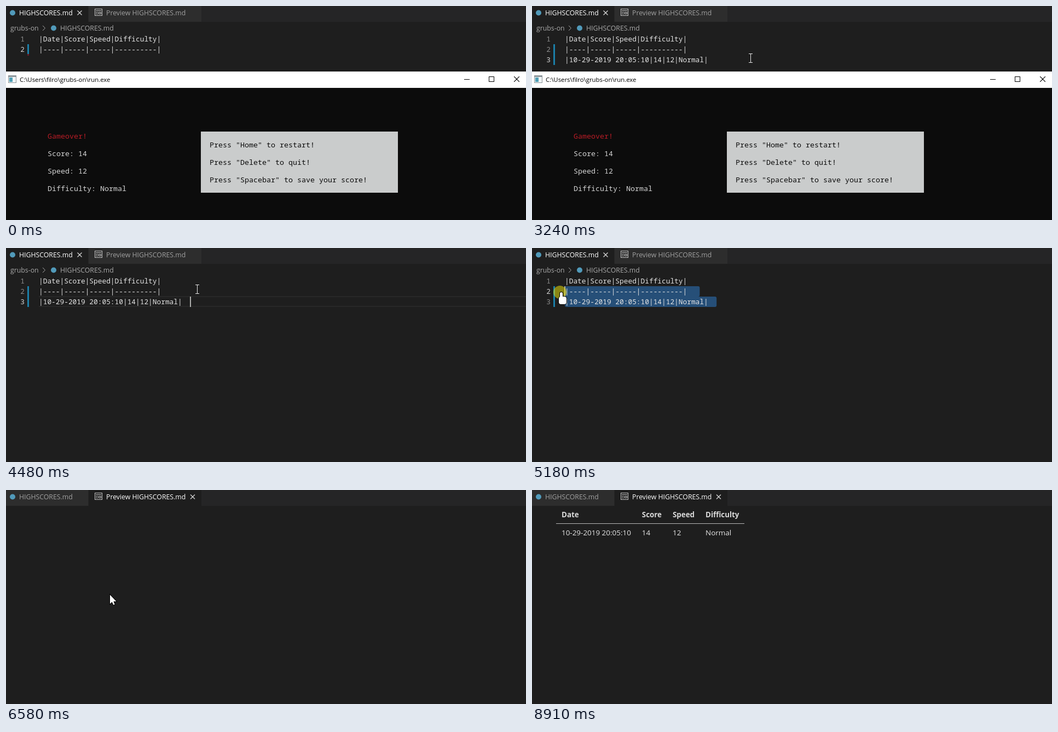
These frames come from a looping animation (950x392 px, 9.22 s). An HTML page with a canvas:

```html
<!DOCTYPE html>
<html lang="en">
<head>
<meta charset="utf-8">
<title>Saving a high score</title>
<style>
html, body { margin: 0; width: 100%; height: 100%; overflow: hidden; background: #1e1e1e; }
canvas { display: block; }
</style>
</head>
<body>
<canvas id="stage" width="950" height="392"></canvas>
<script>
const ctx = document.getElementById('stage').getContext('2d');
const LOOP = 9220, STEP = 77.5;
const UI = '"Open Sans", "Noto Sans", sans-serif';
const MONO = '"Noto Sans Mono", "DejaVu Sans Mono", monospace';
const TAB_FONT = `12.3px ${UI}`;
const CODE_FONT = `12.83px ${MONO}`;
const CONSOLE_FONT = `13.33px ${MONO}`;
const CODE_X = 60, CHAR = 7.7, ROW = 19, ROW_TOP = 51;
const FILE = 'HIGHSCORES.md', FOLDER = 'grubs-on', USER = 'filro';
const HEADS = ['Date', 'Score', 'Speed', 'Difficulty'];
const VALUES = ['10-29-2019 20:05:10', '14', '12', 'Normal'];
const LINES = [HEADS, HEADS.map(head => '-'.repeat(head.length)), VALUES]
  .map(cells => `|${cells.join('|')}|  `);

// Times at which the scene switches
const SAVED = 2240, GUTTER = 2390, FOCUS = 3320, DRAG = 4484, RELEASE = 5650, PREVIEW = 6030, TABLE = 7660;
const CLICK = 150;

// Pointer moves; an optional bend pulls the path into a curve
const MOVES = [
  { start: 840, end: 1460, to: [454, 324] },
  { start: 2390, end: 3240, to: [399, 95], bend: [430, 60] },
  { start: 3400, end: 4090, to: [346, 18] },
  { start: 4330, end: DRAG, to: [350, 95] },
  { start: 4562, end: 5180, to: [53, 82], bend: [120, 100] },
  { start: 5260, end: 5490, to: [52, 97] },
  { start: RELEASE, end: 5880, to: [240, 13] },
  { start: PREVIEW, end: 6890, to: [174, 198], bend: [203, 215] },
  { start: 8280, end: 8910, to: [843, 410], bend: [400, -15] }
];

const ARROW = new Path2D('M0 0V16.5L3.7 13 6.2 18.5 8.7 17.4 6.4 12H11.5Z');
const IBEAM = new Path2D('M-3-7.5h7M.5-7.5v16M-3 8.5h7');
const HAND = new Path2D();
HAND.roundRect(-2, -1, 5, 16, 2.5);
HAND.roundRect(-4, 7, 14, 14, 4);

const ease = u => u * u * (3 - 2 * u);

function pointerAt(t) {
  let from = [402, 357], position = null;
  for (const { start, end, to, bend } of MOVES) {
    if (t < start) break;
    const last = Math.round((end - start) / STEP);
    const step = Math.min(Math.floor((t - start) / (end - start) * last + 1e-6), last);
    const u = ease((step + 1) / (last + 1));
    position = from.map((a, axis) => {
      const middle = bend ? bend[axis] : (a + to[axis]) / 2;
      return (1 - u) ** 2 * a + 2 * u * (1 - u) * middle + u * u * to[axis];
    });
    from = to;
  }
  return position;
}

function rect(x, y, w, h, color) {
  ctx.fillStyle = color;
  ctx.fillRect(x, y, w, h);
}

function frame(x, y, w, h, color) {
  ctx.strokeStyle = color;
  ctx.lineWidth = 1;
  ctx.strokeRect(x + .5, y + .5, w - 1, h - 1);
}

function text(str, x, y, font, color, align = 'left') {
  ctx.font = font;
  ctx.fillStyle = color;
  ctx.textAlign = align;
  ctx.fillText(str, x, y);
}

function line(color, width, ...points) {
  ctx.strokeStyle = color;
  ctx.lineWidth = width;
  ctx.beginPath();
  points.forEach(([x, y]) => ctx.lineTo(x, y));
  ctx.stroke();
}

function cross(x, y, r, color) {
  for (const side of [-r, r]) line(color, 1.2, [x - side, y - r], [x + side, y + r]);
}

function dot(x, y, r, color) {
  ctx.fillStyle = color;
  ctx.beginPath();
  ctx.arc(x, y, r, 0, Math.PI * 2);
  ctx.fill();
}

function drawTabs(preview, hover) {
  const fill = on => on ? '#1e1e1e' : '#2d2d2d';
  const ink = on => on ? '#ffffff' : '#a0a0a0';
  rect(0, 0, 950, 29, '#252526');
  rect(0, 0, 150, 29, fill(!preview));
  rect(151, 0, 206, 29, fill(preview));
  dot(12, 12.5, 5, '#519aba');
  text(FILE, 24, 17, TAB_FONT, ink(!preview));
  if (!preview) cross(134.5, 12.5, 4, '#d8d8d8');

  frame(162, 5, 14, 13, '#c5c5c5');
  rect(164, 8, 10, 1, '#c5c5c5');
  for (const y of [11, 14]) rect(164, y, 4, 1, '#c5c5c5');
  frame(169, 11, 5, 4, '#c5c5c5');
  text('Preview ' + FILE, 183, 17, TAB_FONT, ink(preview));
  if (preview || hover) cross(341, 12.5, 4, '#d8d8d8');
}

function selectionStart(t, pointer) {
  if (t < DRAG) return null;
  const [x, y] = t < RELEASE ? pointer : [0, 97];
  const row = y < ROW_TOP + 2 * ROW ? 1 : 2;
  const col = Math.max(0, Math.min(LINES[row].length, Math.round((x - CODE_X) / CHAR)));
  return { row, col };
}

function drawEditor(t, pointer) {
  text(FOLDER, 8, 45, TAB_FONT, '#a9a9a9');
  line('#a9a9a9', 1, [67, 36], [71.5, 40.5], [67, 45]);
  dot(87, 40.5, 5, '#519aba');
  text(FILE, 99, 45, TAB_FONT, '#a9a9a9');

  const focused = t >= FOCUS;
  const selected = selectionStart(t, pointer);
  const count = t < SAVED ? 2 : 3;
  const caret = selected || { row: count - 1, col: LINES[count - 1].length };
  const caretTop = ROW_TOP + caret.row * ROW;

  if (selected) {
    for (let row = selected.row; row < count; row++) {
      const from = row === selected.row ? selected.col : 0;
      const to = LINES[row].length + (row < count - 1 ? 1 : 0);
      ctx.fillStyle = '#264f78';
      ctx.beginPath();
      ctx.roundRect(CODE_X + from * CHAR, ROW_TOP + row * ROW, (to - from) * CHAR, ROW, 3);
      ctx.fill();
    }
  } else if (focused) {
    for (const y of [caretTop, caretTop + ROW - 1]) rect(CODE_X, y - 1, 890, 2, '#282828');
  }

  rect(39, 70, 3, t < GUTTER ? ROW : 2 * ROW, '#1b7fa8');
  if (t < GUTTER) rect(39, 88, 3, 3, '#6d1a24');
  for (let row = 0; row < count; row++) {
    const y = ROW_TOP + row * ROW + 14;
    text(row + 1, 34, y, CODE_FONT, row === caret.row ? '#d4d4d4' : '#8c8c8c', 'right');
    text(LINES[row], CODE_X, y, CODE_FONT, '#e4e4e4');
  }
  const blinkOn = selected || (t - FOCUS) % 1000 < 500;
  if (focused && blinkOn) rect(Math.round(CODE_X + caret.col * CHAR) - 1, caretTop, 2, ROW, '#aeafad');
}

function drawConsole() {
  rect(0, 120, 950, 30, '#ffffff');
  rect(0, 150, 950, 242, '#0c0c0c');
  rect(4, 127, 15, 14, '#8b9499');
  rect(5, 130, 13, 10, '#f2f5f6');
  rect(6, 131, 6, 8, '#4f9fb5');
  text(`C:\\Users\\${USER}\\${FOLDER}\\run.exe`, 25, 139, `11.36px ${UI}`, '#000000');
  rect(837, 134, 10, 1, '#000000');
  frame(882, 129, 10, 10, '#000000');
  cross(933, 134, 4.8, '#000000');

  ['Gameover!', 'Score: 14', 'Speed: 12', 'Difficulty: Normal'].forEach((str, i) =>
    text(str, 76, 243 + i * 32, CONSOLE_FONT, i ? '#d4d4d4' : '#b81c26'));
  rect(356, 230, 360, 112, '#cacccc');
  ['"Home" to restart!', '"Delete" to quit!', '"Spacebar" to save your score!'].forEach((str, i) =>
    text('Press ' + str, 372, 259 + i * 32, CONSOLE_FONT, '#0c0c0c'));
}

// Each column is as wide as its longest cell plus padding
function drawTable() {
  const left = 44, pad = 10;
  let x = left;
  HEADS.forEach((head, i) => {
    text(head, x + pad, 50, `bold 13.35px ${UI}`, '#dadada');
    const headWidth = ctx.measureText(head).width;
    text(VALUES[i], x + pad, 83, `13.45px ${UI}`, '#e6e6e6');
    x += Math.max(headWidth, ctx.measureText(VALUES[i]).width) + 2 * pad;
  });
  rect(left, 61, Math.round(x - left), 1, '#b9b9b9');
}

function drawPointer(t, [px, py]) {
  const x = Math.round(px), y = Math.round(py);
  const clicked = [FOCUS, PREVIEW].some(start => t >= start && t < start + CLICK);
  if (clicked || (t >= DRAG && t < RELEASE)) dot(x - 2, y - 1, 12, 'rgba(238, 228, 10, .52)');

  const overTabs = y < 29;
  const overEditor = !overTabs && t < PREVIEW && (t >= FOCUS || y < 120);
  ctx.save();
  ctx.translate(x, y);
  if (overEditor && x >= CODE_X) {
    ctx.strokeStyle = '#e8e8e8';
    ctx.lineWidth = 1;
    ctx.stroke(IBEAM);
  } else {
    const shape = overTabs || overEditor ? HAND : ARROW;
    ctx.strokeStyle = '#000000';
    ctx.lineWidth = 2;
    ctx.stroke(shape);
    ctx.fillStyle = '#ffffff';
    ctx.fill(shape);
  }
  ctx.restore();
}

function draw(t) {
  const pointer = pointerAt(t);
  const preview = t >= PREVIEW;
  const hover = pointer && pointer[1] < 29 && pointer[0] > 150 && pointer[0] < 357;
  rect(0, 0, 950, 392, '#1e1e1e');
  drawTabs(preview, hover);
  if (!preview) drawEditor(t, pointer);
  if (t < FOCUS) drawConsole();
  if (t >= TABLE) drawTable();
  if (pointer) drawPointer(t, pointer);
}

const began = performance.now();
function tick() {
  draw((performance.now() - began) % LOOP);
  requestAnimationFrame(tick);
}
tick();
</script>
</body>
</html>
```
